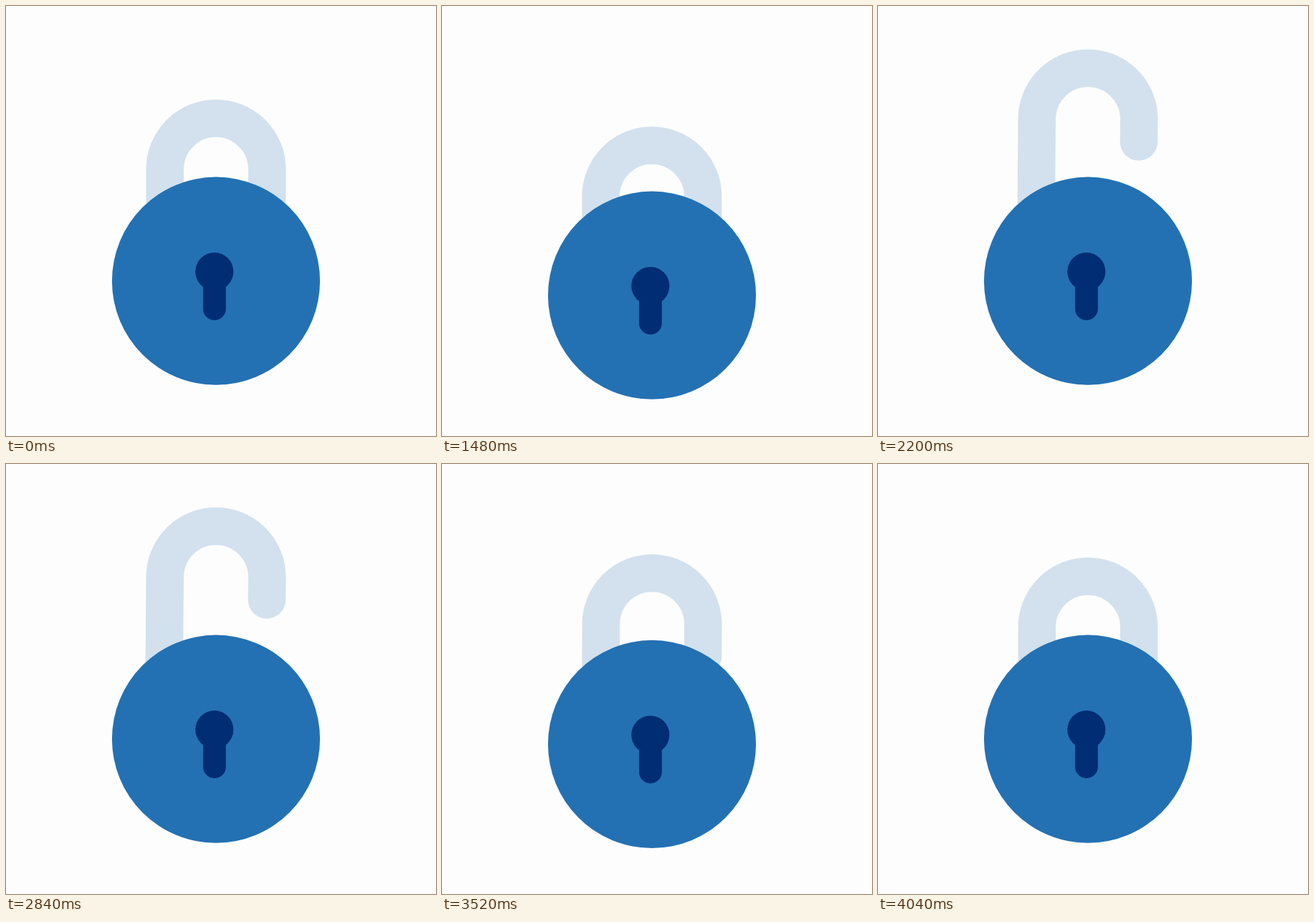
These frames come from a looping animation (600 px wide and 600 px high, 5040 ms). An HTML page:

```html
<!DOCTYPE html>
<html lang="en">
<head>
<meta charset="utf-8">
<title>Padlock</title>
<style>
  html, body { margin: 0; width: 100%; height: 100%; overflow: hidden; background: #fdfdfd; }
  svg { display: block; width: 100%; height: 100%; }
</style>
</head>
<body>
<svg viewBox="0 0 600 600">
  <g id="lock">
    <path id="shackle" fill="none" stroke="#d3e1ee" stroke-width="52.5" stroke-linecap="round"/>
    <circle cx="293" cy="383.7" r="145.1" fill="#2371b3"/>
    <g fill="#002d73">
      <circle cx="290.8" cy="370.6" r="26.6"/>
      <rect x="275" y="370" width="31.8" height="68.5" rx="15.9"/>
    </g>
  </g>
</svg>
<script>
  const LOOP = 5040, STEP = 40;
  const lock = document.getElementById('lock');
  const shackle = document.getElementById('shackle');

  const clamp = u => Math.min(1, Math.max(0, u));
  const smooth = u => u * u * (3 - 2 * u);
  const easeOut = u => u * (2 - u);

  function draw() {
    const t = Math.floor(performance.now() % LOOP / STEP) * STEP;
    const ramp = (from, to, ease = smooth) => ease(clamp((t - from) / (to - from)));

    // Both openings and closings begin with a wind-up, followed by a release.
    const dip = ramp(1160, 1440);
    const rise = ramp(3120, 3400);

    const bob = 21 * dip - 36.7 * ramp(1440, 1850) + 15.7 * ramp(1850, 2200)
      - 18.7 * rise + 45.7 * ramp(3400, 3620) - 27 * ramp(3620, 4040, easeOut);
    const lift = 94 * ramp(1440, 1700) - 24 * dip + 6 * rise - 76 * ramp(3400, 3560);
    const swing = 4 * (ramp(1800, 2180) - ramp(1440, 1730));
    const open = clamp(lift / 70);

    // The free leg shortens and both legs lean slightly as the shackle opens.
    shackle.setAttribute('d',
      `M${221.75 - 1.2 * open} 378 V378 L221.75 228 a71.25 71.25 0 0 1 142.5 0 ` +
      `l${-0.3 * open} ${47 - 15.5 * open}`);
    shackle.setAttribute('transform', `rotate(${swing} 222 287) translate(0 ${-lift})`);
    lock.setAttribute('transform', `translate(0 ${bob})`);
    requestAnimationFrame(draw);
  }
  draw();
</script>
</body>
</html>
```
